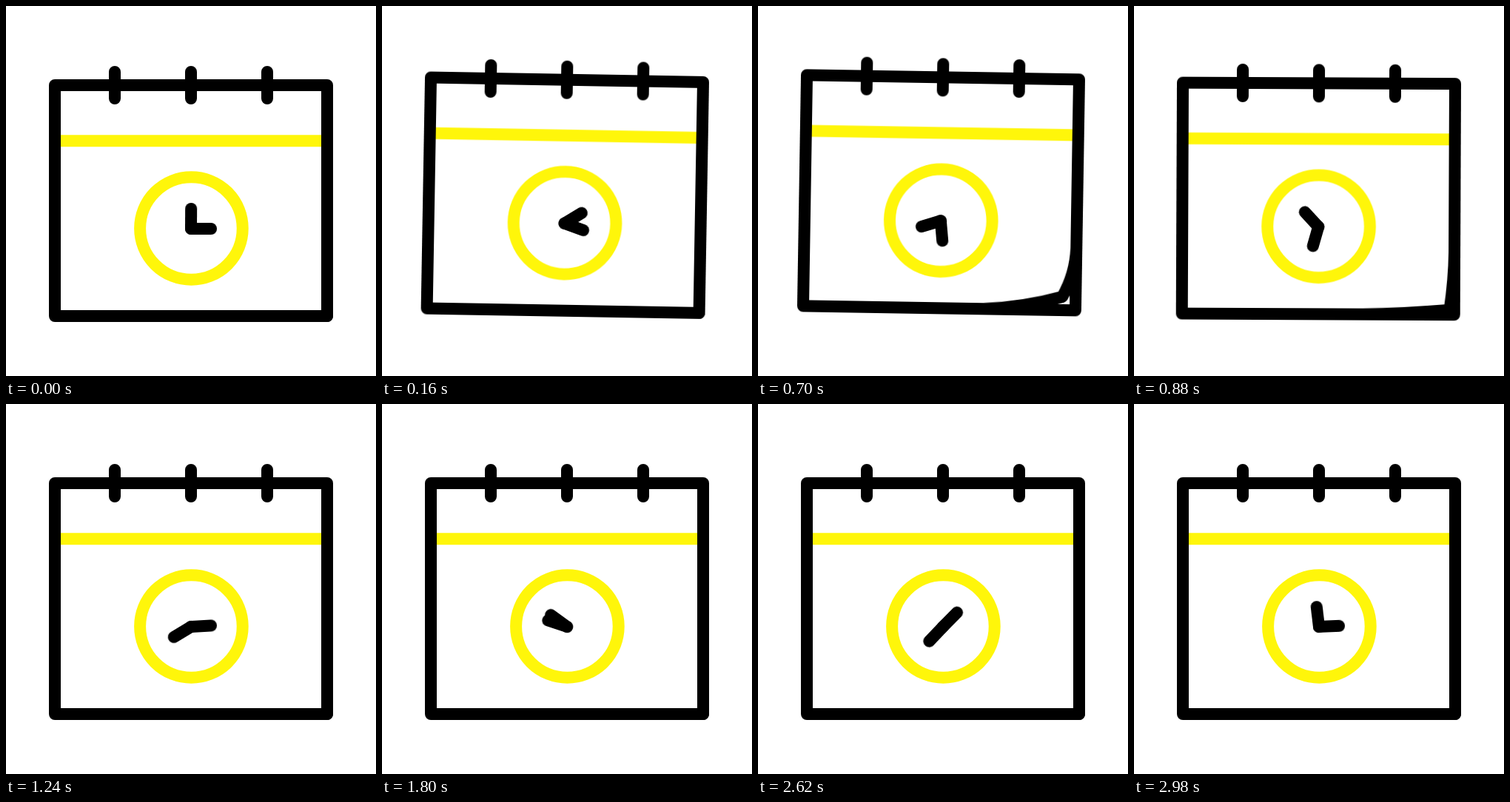
An HTML page that plays this animation: 500x500 px, repeating every 3000 ms.

```html
<!DOCTYPE html>
<html lang="en">
<head>
<meta charset="utf-8">
<title>Calendar</title>
<style>
  html, body { margin: 0; width: 100%; height: 100%; overflow: hidden; background: #fff; }
  svg { display: block; width: 100%; height: 100%; }

  .line { fill: none; stroke: #000; stroke-width: 16; stroke-linecap: round; stroke-linejoin: round; }
  .accent { fill: none; stroke: #fff60a; stroke-width: 16; }

  .lift, .sway, .curl { animation: 3s cubic-bezier(.333, 0, .667, 1) infinite; }
  .lift { animation-name: lift; }
  .sway { animation-name: sway; transform-origin: 250px 107px; }
  .curl { animation-name: curl; }

  .hand { transform-origin: 250px 301px; animation: 3s linear infinite; }
  .fast { animation-name: fast; }
  .slow { animation-name: slow; }

  @keyframes lift {
    0%, 34%, 100% { transform: translateY(0); }
    13.333% { transform: translateY(-20.4px); }
  }
  @keyframes sway {
    0%, 33.333%, 100% { transform: rotate(0deg); }
    6.667%, 20% { transform: rotate(1.1deg); }
    13.333% { transform: rotate(-1.1deg); }
  }
  /* The lower right page corner bends inwards while the calendar drops */
  @keyframes curl {
    0%, 13.333%, 33.333%, 100% { d: path("M310 419 Q365 419 434 419 Q434 372 434 335"); }
    23.333% { d: path("M310 419 Q365 416 416 401 Q433 370 434 335"); }
  }
  @keyframes fast {
    from { transform: rotate(0deg); }
    to { transform: rotate(1080deg); }
  }
  @keyframes slow {
    from { transform: rotate(90deg); }
    to { transform: rotate(450deg); }
  }
</style>
</head>
<body>
<svg viewBox="0 0 500 500">
  <g class="lift">
    <g class="sway">
      <path class="accent" d="M74 182.3H426"/>
      <circle class="accent" cx="250.4" cy="300.5" r="69.3"/>
      <g class="line">
        <rect x="66" y="107" width="368" height="312"/>
        <path class="curl" d="M310 419 Q365 419 434 419 Q434 372 434 335"/>
        <path d="M147 89V125M250 89V125M353 89V125"/>
        <path class="hand fast" d="M250 301V274"/>
        <path class="hand slow" d="M250 301V274"/>
      </g>
    </g>
  </g>
</svg>
</body>
</html>
```
